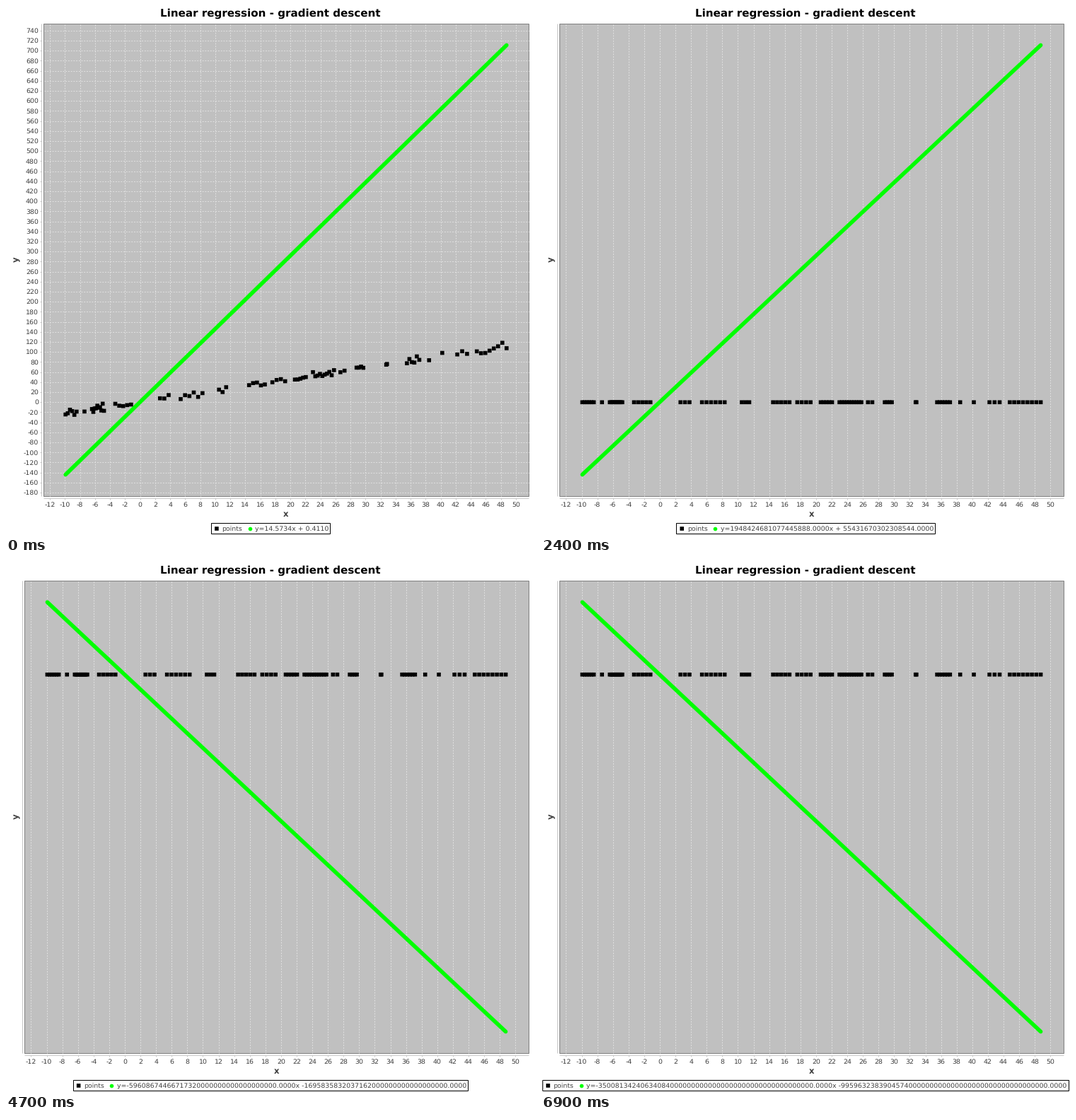
Write a matplotlib script that moves like this. It is 748 px wide and 748 px high and loops after 7 s.

```python
import math

import matplotlib.pyplot as plt
import numpy as np
from matplotlib.animation import FuncAnimation
from matplotlib.patches import Rectangle

SIZE, DPI = 748, 100
PT = 72 / DPI                     # points per pixel
RIGHT, TOP, BOTTOM = 739, 25, 693
MARGIN = 0.05                     # free space on each side of the data
EM = 9.4                          # size of the small text in pixels
DOT = 5.6
DARK, AXIS, GRID, GREEN = "#404040", "#bcbcbc", "#e4e4e4", "#00ff00"
N_FRAMES = 70
LAST_TICKS = 18                   # later y ranges are too large for ticks

plt.rcParams["font.family"] = "DejaVu Sans"
plt.rcParams["text.hinting"] = "none"

# Clusters of samples: first x, last x, count.
CLUSTERS = [
    (-9.92, -8.45, 6), (-7.4, -7.4, 1), (-6.4, -4.8, 10), (-3.3, -1.2, 5),
    (2.65, 3.8, 3), (5.4, 8.3, 6), (10.5, 11.45, 3), (14.5, 16.6, 5),
    (17.6, 19.3, 4), (20.6, 22.05, 5), (23, 25.8, 10), (26.65, 27.2, 2),
    (28.8, 29.7, 4), (32.75, 32.85, 2), (35.5, 37.15, 6), (38.45, 40.2, 2),
    (42.2, 43.5, 3), (44.8, 48.76, 8)]
X = np.concatenate([np.linspace(*c) for c in CLUSTERS])
Y = 2.27 * X + 0.5 + np.random.default_rng(4).normal(0, 3.5, X.size)

# (slope, intercept): each step multiplies the error by GROWTH.
LAST = N_FRAMES - 1
FIRST_LINE = np.array([14.5734, 0.4110])
LAST_LINE = np.array([-3.5008134240634084e50, -9.959632383904574e48])
MID_STEP, MID_SLOPE = 13, -25424584933.0655
GROWTH = -(LAST_LINE[0] / MID_SLOPE) ** (1 / (LAST - MID_STEP))
BEST = FIRST_LINE - LAST_LINE * GROWTH ** -LAST


def params(step):
    return BEST + (LAST_LINE - BEST) * GROWTH ** (step - LAST)


def plain(v):
    """Four decimals; huge values keep only their significant digits."""
    if abs(v) < 2 ** 63:
        return f"{v:.4f}"
    return np.format_float_positional(v, trim="-") + ".0000"


def equation(m, b):
    return f"y={plain(m)}x {'+ ' if b >= 0 else ''}{plain(b)}"


def text_width(s):
    widths = {",": .318, ".": .318, " ": .318, "-": .361, "E": .632,
              "y": .592, "x": .592, "=": .838, "+": .838}
    return EM * sum(widths.get(c, .636) for c in s)


def padded(lo, hi):
    pad = MARGIN * (hi - lo)
    return lo - pad, hi + pad


def tick_unit(px_per_unit, min_px):
    """Smallest 1-2-5 step that is at least min_px long."""
    need = min_px / px_per_unit
    power = math.floor(math.log10(need))
    return next(f * 10.0 ** power for f in (1, 2, 5, 10)
                if f * 10.0 ** power >= need)


def ticks(lo, hi, unit):
    return np.arange(math.ceil(lo / unit), math.floor(hi / unit) + 1) * unit


def tick_label(v, unit):
    if unit < 0.99e7:
        return f"{round(v):,}"
    if v == 0:
        return "0E0"
    e = math.floor(math.log10(abs(v)) + 1e-9)
    return f"{v / 10.0 ** e:.6g}E{e}"


fig = plt.figure(figsize=(SIZE / 100, SIZE / 100), dpi=DPI, facecolor="white")
ax = fig.add_axes([0, 0, 1, 1])


def label(x, y, s, size=EM, color=DARK, ha="left", **kw):
    ax.text(x, y, s, fontsize=size * PT, color=color, ha=ha, va="baseline",
            **kw)


def box(x0, y0, x1, y1, face, edge):
    ax.add_patch(Rectangle((x0, y0), x1 - x0, y1 - y0, facecolor=face,
                           edgecolor=edge, linewidth=PT))


def squares(x, y):
    """Square dots as short thick dashes, placed between pixels."""
    x = np.asarray(x)
    ax.hlines(y, x - DOT / 2, x + DOT / 2, colors="black",
              linewidths=DOT * PT, snap=False, zorder=3)


def dashes(draw, at, start, end):
    draw(at, start, end, colors=GRID, linewidths=.93 * PT,
         linestyles=[(0, (2, 2))])


def legend(m, b):
    text = equation(m, b)
    width = text_width(text) + 64
    x0 = SIZE / 2 + .2 - width / 2
    box(x0, 731, x0 + width - .6, 746, "white", "black")
    squares([x0 + 8], [739])
    ax.plot(x0 + 54.8, 739, "o", color=GREEN, markersize=DOT * PT,
            markeredgewidth=0)
    label(x0 + 15.6, 742.3, "points")
    label(x0 + 62.3, 742.3, text)


def draw(step):
    ax.clear()
    ax.set(xlim=(0, SIZE), ylim=(SIZE, 0))
    ax.axis("off")

    m, b = params(step)
    ends_x = np.array([X.min(), X.max()])
    ends_y = m * ends_x + b
    x_lo, x_hi = padded(*ends_x)
    y_lo, y_hi = padded(min(ends_y.min(), Y.min()), max(ends_y.max(), Y.max()))

    # The y labels decide how far the plot is pushed to the right.
    y_scale = (BOTTOM - TOP) / (y_hi - y_lo)
    y_ticks, y_labels = [], []
    left = 26
    if step <= LAST_TICKS:
        unit = tick_unit(y_scale, 14)
        y_ticks = ticks(y_lo, y_hi, unit)
        y_labels = [tick_label(v, unit) for v in y_ticks]
        if step < LAST_TICKS:
            left = math.floor(32.4 + max(map(text_width, y_labels)))

    x_scale = (RIGHT - left) / (x_hi - x_lo)
    x_ticks = ticks(x_lo, x_hi, 2 if 2 * x_scale > 20.9 else 5)

    def px(x):
        return left + (np.asarray(x) - x_lo) * x_scale

    def py(y):
        return BOTTOM - (np.asarray(y) - y_lo) * y_scale

    box(left, TOP, RIGHT, BOTTOM, "#c0c0c0", "#808080")
    dashes(ax.vlines, px(x_ticks), TOP + 1, BOTTOM)
    if len(y_ticks):
        dashes(ax.hlines, py(y_ticks), left + 1, RIGHT)

    # Axis lines sit a little outside the plot, with short ticks.
    ax_x, ax_y = left - 3, BOTTOM + 3
    thin = dict(colors=AXIS, linewidths=.8 * PT)
    ax.vlines([ax_x], TOP, BOTTOM, **thin)
    ax.hlines([ax_y], left, RIGHT, **thin)
    ax.vlines(px(x_ticks), ax_y, ax_y + 2, **thin)
    for x, v in zip(px(x_ticks), x_ticks):
        label(x, 708, f"{v:.0f}", ha="center")
    if len(y_ticks):
        ax.hlines(py(y_ticks), ax_x - 2, ax_x, **thin)
        for y, s in zip(py(y_ticks), y_labels):
            label(left - 7.1, y + 3.1, s, ha="right")

    ax.plot(px(ends_x), py(ends_y), color=GREEN, linewidth=DOT * PT,
            solid_capstyle="round")
    squares(px(X), py(Y))

    label(SIZE / 2, 15, "Linear regression - gradient descent", 15.13,
          "black", "center", weight="bold")
    label((left + RIGHT) / 2, 722, "x", 11.6, ha="center", weight="bold")
    label(18.3, 358.6, "y", 11.6, ha="center", weight="bold", rotation=90,
          rotation_mode="anchor")
    legend(m, b)
    return []


anim = FuncAnimation(fig, draw, frames=N_FRAMES, interval=100, repeat=True,
                     repeat_delay=0, blit=False)
plt.show()
```
